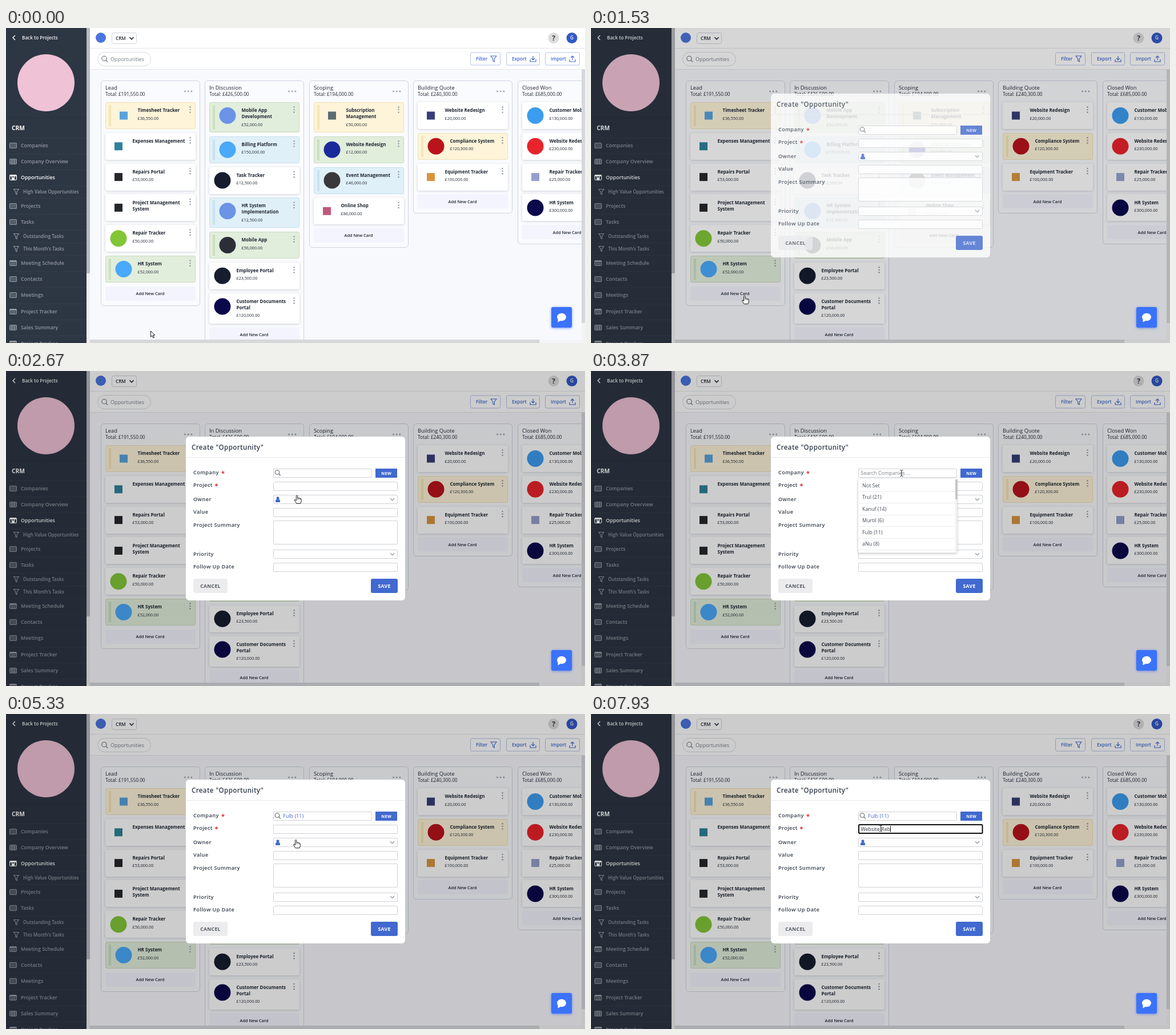
Recreate the animation shown at these times as an HTML page with a canvas. Size 1014 by 552 pixels, loop 8000 ms.

```html
<!DOCTYPE html>
<html lang="en">
<head>
<meta charset="utf-8">
<title>Opportunity board</title>
<style>
html, body { margin: 0; width: 100%; height: 100%; overflow: hidden; background: #f8f9fc; }
canvas { display: block; width: 1014px; height: 552px; }
</style>
</head>
<body>
<canvas id="stage" width="1014" height="552"></canvas>
<script>
const ctx = document.getElementById('stage').getContext('2d');
const LOOP = 8000, STEP = 200 / 3;
const INK = '#1f2733', LABEL = '#343e4d', BLUE = '#4169cf', GREY = '#9298a1';

function text(s, x, y, size, color, weight = 400, align = 'left', spacing = 0) {
  ctx.font = `${weight} ${size}px "Open Sans", "Noto Sans", sans-serif`;
  ctx.letterSpacing = spacing + 'px';
  ctx.textAlign = align;
  ctx.fillStyle = color;
  ctx.fillText(s, x, y + size * 0.36);
}
function rect(x, y, w, h, color) {
  ctx.fillStyle = color;
  ctx.fillRect(x, y, w, h);
}
function box(x, y, w, h, r, fill, border, shadow) {
  ctx.save();
  ctx.beginPath();
  ctx.roundRect(x, y, w, h, r);
  if (shadow) {
    ctx.shadowColor = shadow;
    ctx.shadowBlur = 4;
    ctx.shadowOffsetY = 1;
  }
  if (fill) { ctx.fillStyle = fill; ctx.fill(); }
  ctx.restore();
  if (border) {
    ctx.beginPath();
    ctx.roundRect(x + 0.5, y + 0.5, w - 1, h - 1, r);
    ctx.strokeStyle = border;
    ctx.lineWidth = 1;
    ctx.stroke();
  }
}
function disc(x, y, r, color) {
  ctx.beginPath();
  ctx.arc(x, y, r, 0, Math.PI * 2);
  ctx.fillStyle = color;
  ctx.fill();
}
function line(color, width, ...pts) {
  ctx.beginPath();
  for (let i = 0; i < pts.length; i += 2) ctx.lineTo(pts[i], pts[i + 1]);
  ctx.strokeStyle = color;
  ctx.lineWidth = width;
  ctx.stroke();
}
const chevron = (x, y, s, color, w) => line(color, w, x - s, y - s / 2, x, y + s / 2, x + s, y - s / 2);
function funnel(x, y, s, color) {
  ctx.beginPath();
  [[-1, -1], [1, -1], [.25, 0], [.25, 1], [-.25, .7], [-.25, 0]]
    .forEach(([a, b]) => ctx.lineTo(x + a * s, y + b * s));
  ctx.closePath();
  ctx.strokeStyle = color;
  ctx.lineWidth = 1.1;
  ctx.stroke();
}
function tray(x, y, dir) {
  line(BLUE, 1.2, x - 5, y + 1, x - 5, y + 5, x + 5, y + 5, x + 5, y + 1);
  line(BLUE, 1.2, x, y - 5, x, y + 2);
  const tip = dir > 0 ? 2 : -5;
  line(BLUE, 1.2, x - 3, y + tip - 3 * dir, x, y + tip, x + 3, y + tip - 3 * dir);
}
function magnifier(x, y, r, color) {
  ctx.beginPath();
  ctx.arc(x - 1, y - 1, r, 0, Math.PI * 2);
  ctx.strokeStyle = color;
  ctx.lineWidth = 1.1;
  ctx.stroke();
  line(color, 1.2, x - 1 + r * .7, y - 1 + r * .7, x + r + 1, y + r + 1);
}

// Sidebar: [label, y, icon]
const menu = [
  ['Companies', 206, 'box'], ['Company Overview', 234, 'grid'], ['Opportunities', 262, 'board'],
  ['High Value Opportunities', 287], ['Projects', 312, 'box'], ['Tasks', 340, 'box'],
  ['Outstanding Tasks', 365], ["This Month's Tasks", 387], ['Meeting Schedule', 412, 'date'],
  ['Contacts', 440, 'box'], ['Meetings', 468, 'box'], ['Project Tracker', 497, 'date'],
  ['Sales Summary', 525, 'grid'], ['Project Tracker', 553, 'date']
];
function menuIcon(kind, y, color) {
  const top = y - 5;
  box(6, top, 13, 10, 1.5, kind === 'box' ? '#555d68' : '#3f4853', color);
  if (kind === 'grid') {
    for (let i = 0; i < 3; i++) line(color, 1, 7, top + 2.5 + i * 2.5, 18, top + 2.5 + i * 2.5);
    line(color, 1, 10.5, top, 10.5, top + 10);
    line(color, 1, 14.5, top, 14.5, top + 10);
  }
  if (kind === 'board') {
    rect(7, top, 11, 3, color);
    [10.5, 14.5].forEach(x => line(color, 1, x, top, x, top + 10));
    rect(11, top + 5, 3, 4, color);
  }
  if (kind === 'date') {
    rect(7, top, 11, 3, color);
    for (let i = 0; i < 6; i++) rect(8.5 + i % 3 * 3, top + 4.5 + (i / 3 | 0) * 2.5, 2, 1.5, color);
  }
}
function sidebar() {
  rect(0, 0, 141, 552, '#2d3643');
  line('#fff', 1.4, 16, 13, 12, 17, 16, 21);
  text('Back to Projects', 28, 17, 8.17, '#f2f4f6', 600);
  disc(70, 96, 50, '#efc2d6');
  rect(0, 157, 141, 1, '#29313c');
  text('CRM', 10, 175, 10.3, '#fff', 700);
  for (const [label, y, icon] of menu) {
    const active = icon === 'board';
    rect(0, y - (icon ? 14 : 11), 141, 1, '#343d49');
    if (icon) menuIcon(icon, y, active ? '#fff' : GREY);
    else funnel(18, y, 4.5, GREY);
    text(label, icon ? 26 : 30, y, icon ? 8.87 : 8.03, active ? '#fff' : GREY, 600);
  }
  rect(141, 0, 6, 552, '#eeeeef');
  rect(141, 0, 6, 430, '#b7b9bd');
}

function toolbar() {
  rect(147, 0, 867, 73, '#fff');
  rect(147, 35, 867, 1, '#e4e6ea');
  rect(147, 72, 867, 1, '#e4e6ea');
  disc(166, 17, 9, '#4a74de');
  box(185, 8, 44, 20, 3, '#fff', '#cfd3da');
  text('CRM', 192, 18, 8.1, INK, 600);
  chevron(220, 18, 3.5, INK, 1.6);
  disc(959, 17.5, 9.5, '#dcdcdd');
  text('?', 959, 17.5, 12, '#33373d', 700, 'center');
  disc(991, 17.5, 9.5, '#3259c6');
  text('G', 991, 17.5, 8.2, '#fff', 600, 'center');
  box(160, 42, 94, 25, 12.5, '#fff', '#d5d9e0');
  magnifier(173, 54.5, 4.2, '#626a76');
  text('Opportunities', 183, 54.5, 9.1, '#747b86');
  [[813, 53, 'Filter'], [876, 59, 'Export'], [944, 61, 'Import']].forEach(([x, w, label]) => {
    box(x, 42.5, w, 23, 2.5, '#fff', '#b3c2ea');
    text(label, x + 10, 54, 8.1, BLUE, 600);
  });
  funnel(854, 54, 5, BLUE);
  tray(923, 54, 1);
  tray(992, 54, -1);
}

const tints = {
  y: ['#fdf4d9', '#eee0b4', '#f5e6b6'],
  g: ['#e2eedc', '#c9dabd', '#cce0bf'],
  b: ['#e0f0f8', '#c5dfec', '#c8e3f0']
};
// Card: [title, amount, logo colour, tint, square logo]
const columns = [
  ['Lead', '191,550', [
    ['Timesheet Tracker', '36,550', '#58a2dc', 'y', 1], ['Expenses Management', '', '#2f829b', '', 1],
    ['Repairs Portal', '53,000', '#26272b', '', 1], ['Project Management|System', '', '#25282b', '', 1],
    ['Repair Tracker', '50,000', '#82c638'], ['HR System', '52,000', '#4aa9fa', 'g']]],
  ['In Discussion', '426,500', [
    ['Mobile App|Development', '52,000', '#6b93e6', 'g'], ['Billing Platform', '150,000', '#4aa9fa', 'b'],
    ['Task Tracker', '12,500', '#151d2e'], ['HR System|Implementation', '12,500', '#6b93e6', 'b'],
    ['Mobile App', '56,000', '#2b2e37', 'g'], ['Employee Portal', '23,500', '#151d2e'],
    ['Customer Documents|Portal', '120,000', '#0b084c']]],
  ['Scoping', '194,000', [
    ['Subscription|Management', '50,000', '#5c6c72', 'y', 1], ['Website Redesign', '12,000', '#1b2a9b', 'g'],
    ['Event Management', '46,000', '#39393b', 'b'], ['Online Shop', '86,000', '#c0587c', '', 1]]],
  ['Building Quote', '240,300', [
    ['Website Redesign', '20,000', '#373f78', '', 1], ['Compliance System', '120,300', '#b9131c', 'y'],
    ['Equipment Tracker', '100,000', '#d8953f', '', 1]]],
  ['Closed Won', '685,000', [
    ['Customer Mobile', '130,000', '#3c9cf0'], ['Website Redesign', '230,000', '#e9232b'],
    ['Repair Tracker', '25,000', '#959fce', '', 1], ['HR System', '300,000', '#0b084c']]]
];
const isTall = ([title, amount]) => title.includes('|') && amount;

function card(x, top, data) {
  const [title, amount, logo, tint, square] = data;
  const y = Math.round(top), h = isTall(data) ? 53 : 47, shift = tint ? 9 : 0;
  if (tint) {
    const [fill, border, stripe] = tints[tint];
    box(x, y, 158, h, 3, fill, border);
    rect(x + 6, y + 5, 4, h - 10, stripe);
  } else {
    box(x, y, 158, h, 3, '#fff', null, 'rgba(30,40,70,.2)');
  }
  const cx = x + 23 + shift, cy = top + 23.5;
  if (square) rect(cx - 7, cy - 7, 14, 14, logo);
  else disc(cx, cy, 14.5, logo);
  const lines = title.split('|');
  lines.forEach((s, i) => text(s, x + 47.5 + shift, top + 14.3 + i * 11, 8, INK, 700));
  if (amount) text(`£${amount}.00`, x + 47.5 + shift, top + 17 + lines.length * 11, 7.26, INK, 500);
  for (let i = 0; i < 3; i++) disc(x + 148.5, top + 8.5 + i * 4.6, 1.2, '#8d939d');
}
function board() {
  rect(147, 73, 867, 479, '#f8f9fd');
  ctx.save();
  ctx.beginPath();
  ctx.rect(147, 73, 861, 473);
  ctx.clip();
  columns.forEach(([name, total, cards], i) => {
    const x = Math.round(165.5 + i * 182.5);
    const buttonY = cards.reduce((y, c) => y + (isTall(c) ? 59.7 : 53.8), 130);
    box(x, 92, 174, Math.round(buttonY) + 34 - 92, 5, '#fafbfe', '#cdd3e0');
    text(name, x + 8, 105, 9.3, INK);
    text(`Total: £${total}.00`, x + 8, 116.5, 8.25, INK);
    for (let k = 0; k < 3; k++) disc(x + 147.5 + k * 5.7, 111, 1.5, '#a0a6b0');
    let y = 130;
    for (const c of cards) {
      card(x + 8, y, c);
      y += isTall(c) ? 59.7 : 53.8;
    }
    box(x + 8, Math.round(y), 158, 25, 3, '#f3f4fd');
    text('Add New Card', x + 86.5, y + 12.7, 7.3, INK, 600, 'center');
  });
  ctx.restore();
  rect(1008, 73, 6, 479, '#f4f4f6');
  rect(1008, 73, 6, 444, '#d6d7da');
  rect(147, 546, 867, 6, '#f4f4f6');
  rect(147, 546, 787, 6, '#d6d7da');
}
function chatButton() {
  box(955, 489, 36, 36, 3, '#3a72fa', null, 'rgba(40,90,240,.6)');
  ctx.beginPath();
  ctx.ellipse(973, 506.5, 8, 6.8, 0, 0, Math.PI * 2);
  ctx.fillStyle = '#fff';
  ctx.fill();
  ctx.beginPath();
  ctx.moveTo(966.5, 508);
  ctx.lineTo(966.5, 515.5);
  ctx.lineTo(973, 512);
  ctx.fill();
}

// Moments, counted in steps
const CLICK_ADD = 23, LEAVE_ADD = 33, LIST_OPEN = 51, LIST_PICK = 74, LEAVE_LIST = 77, FOCUS = 86;
const keysAt = [94, 98, 100, 101, 103, 105, 106, 108, 112, 114, 119];

const options = ['Not Set', 'Trul (21)', 'Kanuf (14)', 'Murtil (6)', 'Fulb (11)', 'aNu (8)'];
const ROW = 20.5;
const labels = [['Company', 178], ['Project', 200], ['Owner', 225], ['Value', 247],
  ['Project Summary', 269.5], ['Priority', 321], ['Follow Up Date', 343]];
// Field: [top, height, width, pointer shape over it]
const fields = [[171, 16, 173, 'hand'], [194, 16, 218, 'beam'], [217, 16, 218, 'hand'],
  [240, 16, 218, 'beam'], [262, 42, 218, 'beam'], [313, 16, 218, 'hand'], [336, 16, 218, 'beam']];

function dialog(n, pointer) {
  const open = n >= LIST_OPEN && n < LIST_PICK;
  box(315, 115, 384, 287, 6, '#fff');
  text('Create "Opportunity"', 325, 133.5, 11.6, LABEL, 600, 'left', .35);
  rect(315, 151, 384, 1, '#e8e9ec');
  for (const [s, y] of labels) text(s, 328, y, 9.24, LABEL, 600, 'left', .35);
  text('*', 377, 179, 11, '#e02d2d', 700);
  text('*', 365.5, 201.5, 11, '#e02d2d', 700);

  for (const [y, h, w] of fields) box(468, y, w, h, 1.5, '#fff', '#d0d2d6');
  if (open) text('Search Companies ...', 472.5, 179, 8.95, '#7b8087');
  else magnifier(476, 178.5, 3.8, '#5a6069');
  if (n >= LIST_PICK) text(options[4], 485, 179, 9.05, BLUE);
  rect(647, 171, 38, 16, BLUE);
  text('NEW', 666.2, 179, 7.26, '#fff', 700, 'center', .35);

  disc(476, 222.7, 2.5, BLUE);
  box(472, 225, 8, 5, [2.5, 2.5, 1, 1], BLUE);
  chevron(676.5, 225, 3.5, '#8c9199', 1.2);
  chevron(676.5, 321, 3.5, '#8c9199', 1.2);
  if (n >= FOCUS) {
    ctx.beginPath();
    ctx.roundRect(469, 194, 216.5, 15, 1.5);
    ctx.strokeStyle = '#101010';
    ctx.lineWidth = 2;
    ctx.stroke();
    const typed = 'Website Reb'.slice(0, keysAt.filter(k => k <= n).length);
    text(typed, 472.5, 201.5, 8.95, '#30363f');
    rect(Math.round(472.5 + ctx.measureText(typed).width), 196, 1, 11, '#222');
  }
  box(328, 364, 60, 25, 3, '#ececee');
  text('CANCEL', 358, 377, 8.58, '#525862', 700, 'center', .35);
  box(639, 364, 47, 25, 3, BLUE);
  text('SAVE', 662.5, 377, 8.58, '#fff', 700, 'center', .35);

  if (open) {
    box(468, 189, 173, 129.5, 1, '#fff', null, 'rgba(0,0,0,.3)');
    const hovered = Math.floor((pointer.y - 190) / ROW);
    options.forEach((s, i) => {
      const y = 190 + i * ROW;
      if (i === hovered) rect(469, y, 169, ROW, '#f1f3f6');
      text(s, 475, y + 10.5, 8.95, '#454c57');
      rect(469, Math.round(y + ROW), 169, 1, '#eaebee');
    });
    rect(638, 190, 3.5, 128, '#f1f1f2');
    rect(638, 190, 3.5, 35, '#c3c4c7');
  }
}

// Pointer: [step, x, y]
const path = [
  [0, 253.5, 531], [5, 253.5, 531], [14, 268.7, 469], [32, 268.7, 469], [45, 542.5, 183],
  [47, 543, 177], [57, 543, 177], [58, 544, 179], [64, 510, 297], [66, 510, 297],
  [69, 508, 279], [76, 508, 278], [84, 507.5, 200.5], [120, 507.5, 200.5]
];
function shapeAt(x, y, n) {
  if (n < LEAVE_ADD) return y < 478 ? 'hand' : 'arrow';
  if (n >= LIST_OPEN && n < LEAVE_LIST) return y > 190 ? 'hand' : 'beam';
  const under = fields.find(([top, h, w]) => x > 468 && x < 468 + w && y >= top && y < top + h);
  return under ? under[3] : 'arrow';
}
// A hand's motion: quick start, long settling
function glide(u) {
  const v = 1 - (1 - u) ** 1.6;
  return v * v * (3 - 2 * v);
}
function pointerAt(n) {
  let i = 0;
  while (i < path.length - 2 && path[i + 1][0] <= n) i++;
  const [t0, x0, y0] = path[i], [t1, x1, y1] = path[i + 1];
  const e = glide((n - t0) / (t1 - t0));
  const x = x0 + (x1 - x0) * e, y = y0 + (y1 - y0) * e;
  return { x, y, shape: shapeAt(x, y, n) };
}
function drawPointer({ x, y, shape }) {
  ctx.save();
  ctx.translate(x, y);
  ctx.lineJoin = 'round';
  if (shape === 'beam') {
    line('#222', 1, -2.5, -5.5, -.5, -5, 0, -4.5, 0, 4.5, -.5, 5, -2.5, 5.5);
    line('#222', 1, 2.5, -5.5, .5, -5, 0, -4.5);
    line('#222', 1, 2.5, 5.5, .5, 5, 0, 4.5);
  } else {
    const outline = new Path2D(shape === 'arrow'
      ? 'M0 0V10.2L2.4 8L4.2 12L6 11.2L4.3 7.3H7.4Z'
      : 'M-1.2 1Q0 -.8 1.2 1V5Q2.6 4 3.6 5.4Q5 4.6 5.8 6Q7.6 5.6 7.6 7.6V11L6.4 14.6H-.6L-4 9.4Q-4.4 7.6 -2.8 8L-1.2 9.6Z');
    ctx.fillStyle = '#fff';
    ctx.fill(outline);
    ctx.strokeStyle = '#1a1a1a';
    ctx.lineWidth = 1;
    ctx.stroke(outline);
    if (shape === 'hand') [1.2, 3.6, 5.8].forEach(a => line('#1a1a1a', .7, a, 5.5, a, 8));
  }
  ctx.restore();
}

function draw(t) {
  const n = Math.floor((t + 3.5) / STEP) % 120;
  const fade = n < CLICK_ADD ? 0 : 1 - .2 * .15 ** (n - CLICK_ADD);
  const pointer = pointerAt(n);
  board();
  toolbar();
  sidebar();
  if (fade) {
    rect(0, 0, 1014, 552, `rgba(0,0,0,${.2 * fade})`);
    ctx.globalAlpha = fade;
    dialog(n, pointer);
    ctx.globalAlpha = 1;
  }
  chatButton();
  drawPointer(pointer);
}
const start = performance.now();
function tick() {
  draw((performance.now() - start) % LOOP);
  requestAnimationFrame(tick);
}
tick();
</script>
</body>
</html>
```
